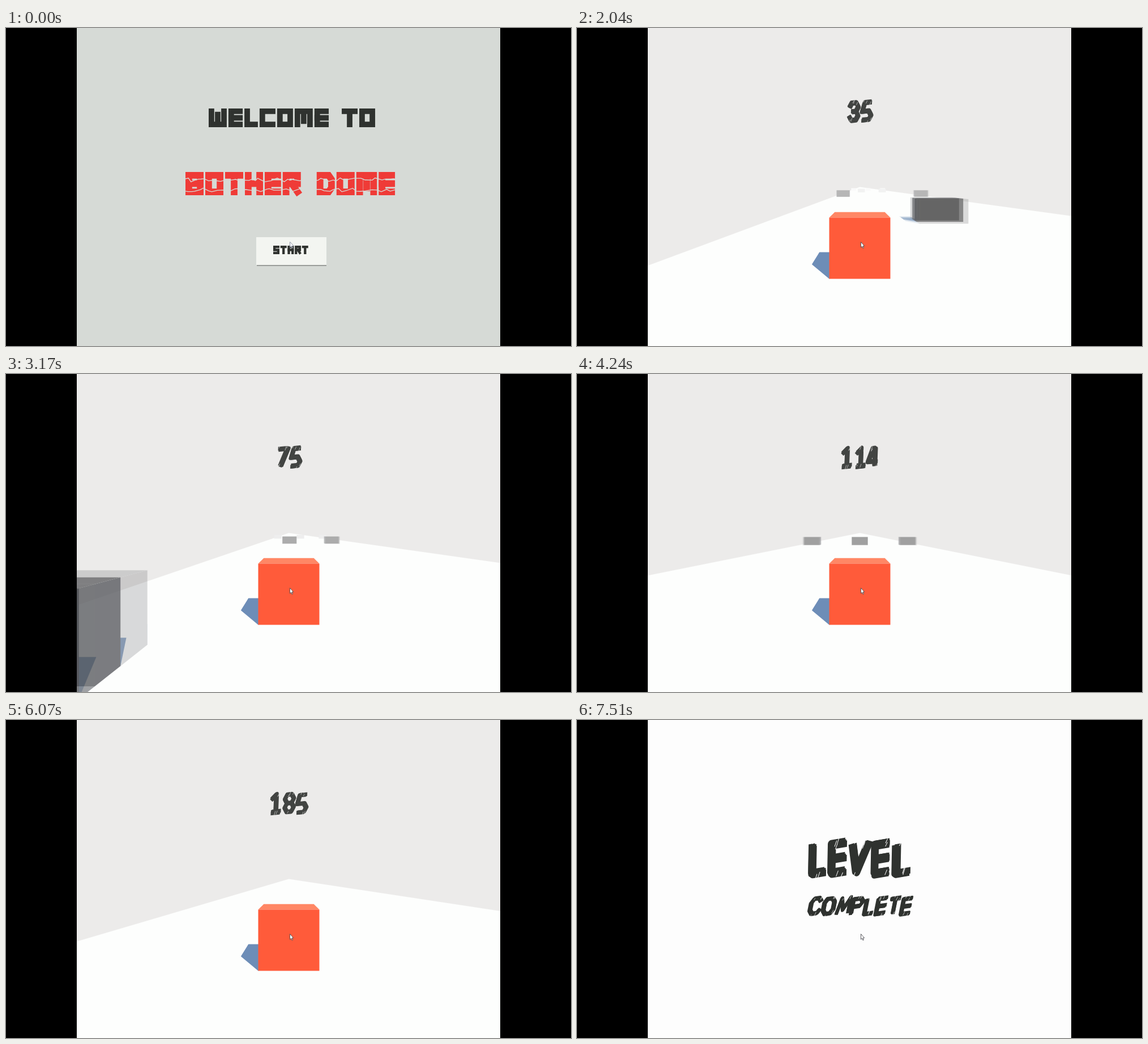
An HTML page with a canvas for the animation above (7550 ms loop, 998 px wide and 561 px high).

```html
<!DOCTYPE html>
<html lang="en">
<head>
<meta charset="utf-8">
<title>Cube runner</title>
<style>
html, body { margin: 0; width: 100%; height: 100%; overflow: hidden; background: #000; }
canvas { display: block; width: 998px; height: 561px; }
</style>
</head>
<body>
<canvas id="stage" width="998" height="561" role="img" aria-label="Welcome to Bother Dome. Start. Level complete."></canvas>
<script>
const W = 998, H = 561, LOOP = 7550, STEP = 1001 / 30;
const VIEW = { x: 125, w: 748 };
const FOCAL = 486, CX = 499.5, HORIZON = 280.5;
const EYE = 1.5, HALF_FLOOR = 7.5;
const SKY = '#ecebea', FLOOR = '#fdfefd', MENU = '#d6dad6', INK = '#2f322f';
const START = 300, PANEL = [6250, 6880], TITLE = [6920, 7420];
const EXPOSURES = [0.22, 0.56, 0.22];

const screen = document.getElementById('stage').getContext('2d');
const layer = document.createElement('canvas');
layer.width = W;
layer.height = H;
const scene = layer.getContext('2d');

// Time and distance along the track
const RUN = [[300, 0], [600, 1.6], [900, 5.8], [1200, 11.9], [1600, 22.2], [2040, 35.3],
  [3170, 75.2], [4240, 114.5], [4970, 143.2], [6070, 185.2], [7100, 225]];
// Time and sideways position
const STEER = [[300, 0], [1100, 0], [1950, -3.45], [2500, -3.45], [3170, -3.1], [3350, -3],
  [4050, 0], [4450, 0], [5200, -2.4], [7100, -2.4]];
// Distance of a row and the positions of its blocks
const ROWS = [[42.5, [0]], [72.8, [-6, 6]], [109.4, [-3, 3]], [144.2, [-6, 0, 6]]];

// Stroke letters on a 0..4 grid, "xy" pairs
const GLYPHS = {
  0: '10 30 41 43 34 14 03 01 10', 1: '01 20 24,04 44', 2: '01 10 30 41 04 44',
  3: '01 10 30 41 32 12,32 43 34 14 03', 4: '34 30 20 03 43', 5: '40 10 02 32 43 34 04',
  6: '30 10 01 03 14 34 43 32 02', 7: '00 40 14', 8: '12 01 10 30 41 32 12 03 14 34 43 32',
  9: '42 12 01 10 30 41 43 34 14',
  A: '04 00 40 44,02 42', B: '00 40 44 04 00,02 42', C: '40 00 04 44', D: '00 30 41 43 34 04 00',
  E: '40 00 04 44,02 42', H: '00 04,40 44,02 42', L: '00 04 44', M: '04 00 40 44,20 23',
  O: '00 40 44 04 00', R: '04 00 40 42 02,22 44', S: '40 00 02 42 44 04',
  T: '00 40,20 24', W: '00 04 44 40,21 24'
};
const BRUSH = {
  ...GLYPHS, C: '41 30 10 01 03 14 34 43', O: GLYPHS[0],
  M: '04 10 23 40 44', P: '04 00 30 41 32 02', V: '00 14 40'
};
const WIDTHS = { M: 1.14, W: 1.14, E: 0.9, L: 0.85 };

const clamp = v => Math.max(0, Math.min(1, v));
const fade = (t, [a, b]) => clamp((t - a) / (b - a));
const smooth = u => u * u * (3 - 2 * u);

function track(keys, t, ease = u => u) {
  let i = 0;
  while (i < keys.length - 2 && t > keys[i + 1][0]) i++;
  const [t0, a] = keys[i], [t1, b] = keys[i + 1];
  return a + (b - a) * ease(clamp((t - t0) / (t1 - t0)));
}

function random(seed) {
  let s = seed * 7919 + 17;
  return () => (s = (s * 16807) % 2147483647) / 2147483647;
}

function rect(c, x, y, w, h, color) {
  c.fillStyle = color;
  c.fillRect(x, y, w, h);
}

function poly(c, points, color) {
  c.beginPath();
  points.forEach(([x, y]) => c.lineTo(x, y));
  c.closePath();
  c.fillStyle = color;
  c.fill();
}

// ---- lettering ----

function strokeGlyph(c, glyph, x, y, w, h, line) {
  c.lineWidth = line;
  for (const part of glyph.split(',')) {
    c.beginPath();
    const pairs = part.split(' ');
    pairs.forEach(p => c.lineTo(x + p[0] / 4 * w, y + p[1] / 4 * h));
    if (pairs.length > 2 && pairs[0] === pairs[pairs.length - 1]) c.closePath();
    c.stroke();
  }
}

function blockText(c, text, x, y, size, h, gap, space, line, color) {
  c.strokeStyle = color;
  c.lineCap = 'square';
  c.lineJoin = 'miter';
  for (const ch of text) {
    if (ch === ' ') { x += space - gap; continue; }
    const w = size * (WIDTHS[ch] || 1);
    strokeGlyph(c, GLYPHS[ch], x + line / 2, y + line / 2, w - line, h - line, line);
    x += w + gap;
  }
}

function brushText(c, text, x, y, pitch, h, line, rise, lean, color, back) {
  c.lineJoin = 'round';
  c.lineCap = 'butt';
  [...text].forEach((ch, i) => {
    const rnd = random(ch.charCodeAt(0) + i * 31);
    const advance = pitch * (WIDTHS[ch] || 1);
    const w = advance - line * 0.8;
    c.save();
    c.translate(x + line / 2, y + line / 2);
    c.transform(1, -rise, -lean, 1, h * lean / 2, w * rise / 2);
    c.strokeStyle = color;
    for (let k = 0; k < 4; k++) {
      const dx = (rnd() - 0.5) * line * 0.45, dy = (rnd() - 0.5) * line * 0.45;
      strokeGlyph(c, BRUSH[ch], dx, dy, w, h - line, line * 0.78);
    }
    c.strokeStyle = back;
    c.lineWidth = Math.max(0.6, line * 0.07);
    for (let k = 0; k < 5; k++) {
      const sx = rnd() * w, sy = (k % 2 ? 0.8 + rnd() * 0.2 : rnd() * 0.2 - 0.06) * h;
      c.beginPath();
      c.moveTo(sx, sy);
      c.lineTo(sx + line * 0.25, sy - line * (0.4 + rnd() * 0.5));
      c.stroke();
    }
    c.restore();
    x += advance;
  });
}

function crack(c, x0, x1, y, seed) {
  const rnd = random(seed);
  c.strokeStyle = MENU;
  c.lineWidth = 1.3;
  c.lineJoin = 'miter';
  c.beginPath();
  for (let x = x0; x < x1; x += 4 + rnd() * 9) c.lineTo(x, y + (rnd() - 0.5) * 7);
  c.stroke();
}

function cursor(c, fill, edge) {
  c.beginPath();
  [[501.5, 377.5], [501.5, 387], [503.6, 385.2], [505, 388.6], [506.4, 388], [505, 384.8], [507.6, 384.4]]
    .forEach(([x, y]) => c.lineTo(x, y));
  c.closePath();
  c.fillStyle = fill;
  c.fill();
  c.strokeStyle = edge;
  c.lineWidth = 0.9;
  c.lineJoin = 'miter';
  c.stroke();
}

// ---- track ----

function project(x, y, z) {
  const s = FOCAL / Math.max(z, 0.3);
  return [CX + x * s, HORIZON + y * s];
}

function fog(rgb, z) {
  const f = 1 - Math.exp(-((0.022 * z) ** 2));
  return `rgb(${rgb.map(v => Math.round(v + (250 - v) * f))})`;
}

function shadow(c, b) {
  const dx = -0.43, dz = 0.84;
  const alpha = clamp(1.15 - b.z0 / 30);
  if (!alpha || b.z1 < 0.3) return;
  c.globalAlpha = alpha;
  poly(c, [
    project(b.x0, EYE, b.z0), project(b.x0 + dx, EYE, b.z0 + dz),
    project(b.x0 + dx, EYE, b.z1 + dz), project(b.x1 + dx, EYE, b.z1 + dz),
    project(b.x1, EYE, b.z1)
  ], fog([108, 140, 182], b.z0));
  c.globalAlpha = 1;
}

function block(c, b) {
  if (b.z1 < 0.3) return;
  const top = 0.5, { x0, x1, z0, z1 } = b;
  const side = x0 > 0 ? x0 : x1 < 0 ? x1 : 0;
  poly(c, [project(x0, top, z0), project(x1, top, z0), project(x1, top, z1), project(x0, top, z1)], fog(b.top, z0));
  if (side) {
    poly(c, [project(side, top, z0), project(side, EYE, z0), project(side, EYE, z1), project(side, top, z1)], fog(b.side, z0));
  }
  if (z0 > 0.3) {
    poly(c, [project(x0, top, z0), project(x1, top, z0), project(x1, EYE, z0), project(x0, EYE, z0)], fog(b.front, z0));
  }
}

function drawTrack(c, t) {
  const px = track(STEER, t, smooth);
  const eyeZ = track(RUN, t) - 5;
  rect(c, 0, 0, W, H, SKY);
  poly(c, [
    [CX, HORIZON], project(HALF_FLOOR - px, EYE, 0.3), project(-HALF_FLOOR - px, EYE, 0.3)
  ], FLOOR);

  const blocks = [{ x0: -0.5, x1: 0.5, z0: 4.5, z1: 5.5, front: [255, 89, 56], top: [255, 134, 100], side: [225, 75, 45] }];
  for (const [z, xs] of ROWS) {
    for (const x of xs) {
      blocks.push({
        x0: x - 1 - px, x1: x + 1 - px, z0: z - 0.5 - eyeZ, z1: z + 0.5 - eyeZ,
        front: [92, 92, 92], top: [96, 97, 100], side: [86, 88, 93]
      });
    }
  }
  blocks.sort((a, b) => b.z0 - a.z0);
  blocks.forEach(b => shadow(c, b));
  blocks.forEach(b => block(c, b));
}

// Short exposures, half a step apart, averaged into one picture
function drawRun(c, t) {
  let total = 0;
  EXPOSURES.forEach((weight, k) => {
    drawTrack(scene, t + (k - 1) * STEP / 2);
    total += weight;
    c.globalAlpha = weight / total;
    c.drawImage(layer, 0, 0);
  });
  c.globalAlpha = 1;
  const score = String(Math.floor(track(RUN, t)));
  brushText(c, score, CX - score.length * 11.3, 127.5, 22.6, 39, 8.5, 0.1, 0.04, '#424442', SKY);
}

function drawMenu(c) {
  rect(c, 0, 0, W, H, MENU);
  blockText(c, 'WELCOME TO', 358, 142, 28, 33, 3, 23, 9.8, INK);
  blockText(c, 'BOTHER DOME', 317, 254, 32, 41, 3, 28, 11.8, '#ef3b37');
  crack(c, 314, 692, 268, 5);
  crack(c, 314, 692, 286, 11);
  rect(c, 443, 370, 123, 50, '#9a9d9a');
  rect(c, 442, 369, 124, 49, '#f3f5f1');
  blockText(c, 'START', 472, 384, 11, 15, 1.7, 6, 4.3, INK);
  cursor(c, 'rgba(244,246,250,0.9)', '#8a90a0');
}

function drawComplete(c, t) {
  c.globalAlpha = fade(t, PANEL);
  rect(c, 0, 0, W, H, '#fdfdfd');
  c.globalAlpha = fade(t, TITLE);
  if (c.globalAlpha > 0) {
    brushText(c, 'LEVEL', 408, 211, 40.8, 65, 14.5, 0.17, 0.02, INK, '#fdfdfd');
    brushText(c, 'COMPLETE', 408, 311, 23.6, 34, 7.6, 0.14, 0.2, INK, '#fdfdfd');
  }
  c.globalAlpha = 1;
}

function draw(t) {
  const c = screen;
  c.save();
  rect(c, 0, 0, W, H, '#000');
  c.beginPath();
  c.rect(VIEW.x, 0, VIEW.w, H);
  c.clip();
  if (t < START) {
    drawMenu(c);
  } else {
    if (t < PANEL[1]) drawRun(c, t);
    if (t > PANEL[0]) drawComplete(c, t);
    cursor(c, '#fff', '#4a4a50');
  }
  c.restore();
}

const begin = performance.now();
function tick() {
  const t = (performance.now() - begin) % LOOP;
  draw(Math.floor((t + 5) / STEP) * STEP);
  requestAnimationFrame(tick);
}
tick();
</script>
</body>
</html>
```
